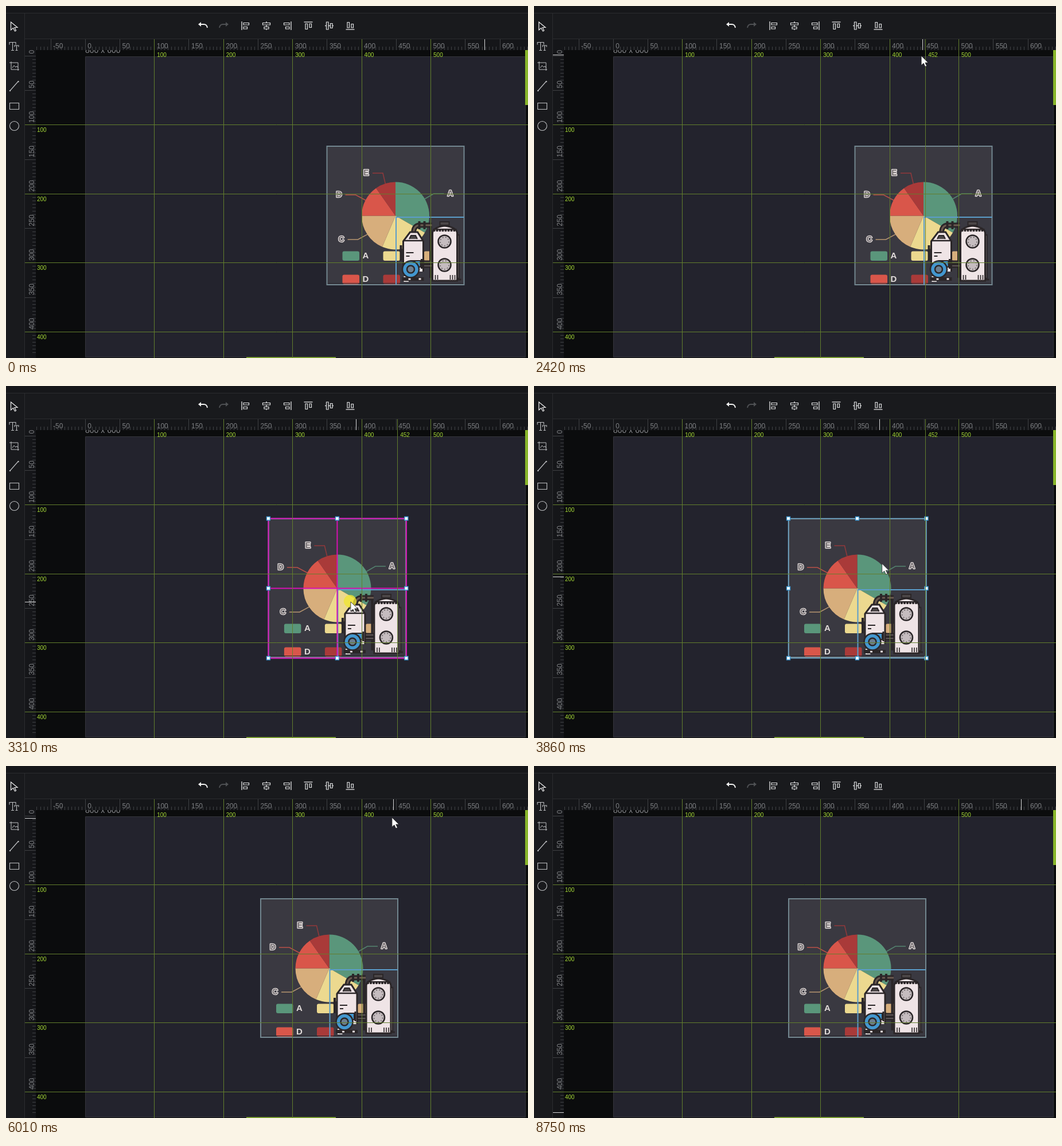
These frames come from a looping animation (910 px wide and 615 px high, 9290 ms). An HTML page with a canvas:

```html
<!DOCTYPE html>
<html>
<head>
<meta charset="utf-8">
<style>
html, body { margin: 0; height: 100%; overflow: hidden; background: #0a0b0c; }
canvas { display: block; }
</style>
</head>
<body>
<canvas id="stage" width="910" height="615"></canvas>
<script>
const ctx = document.getElementById('stage').getContext('2d');
const LOOP = 9290, W = 910, H = 615, UNIT = 1.2045, LAG = 50;
const FONT = '"Liberation Sans", Arial, sans-serif';
const DARK = '#2b2628', PALE = '#efe4e6', BLUE = '#4397cf', MAGENTA = '#d711b4';
const GREY = '#c5bcbf', INK = '#bfc1c3', BAR = '#191a1d', EDGE = '#2b2c2f';
const unitX = u => 138.3 + u * UNIT, unitY = u => 87.5 + u * UNIT;

// Moments of the story, in ms
const ADD_GUIDE = 1210, GRAB = 2750, DROP = 3440, DROP_GUIDE = 5410, DROP_SECOND = 7350, BLINK = 65;

// Moves: start, end, x, y at the end
const POINTER_START = [832, 640];
const POINTER_MOVES = [
  [0, 880, 681, 68], [1810, 2420, 675, 86], [2420, 2700, 710, 371],
  [GRAB, 3030, 643, 375], [3030, 3310, 601, 377], [3310, DROP, 587, 377],
  [3710, 4400, 677, 72], [4600, 4670, 677, 80], [4670, 5210, 673, 90],
  [6010, 6600, 618, 70], [6600, 6810, 612, 86], [7080, 7210, 614, 84],
  [7210, DROP_SECOND, 617, 74], [7610, 8480, 645, 330], [8480, 8750, 892, 665]];
const GROUP_START = [115.5, 13];
const GROUP_MOVES = [[GRAB, 3030, 49, 0], [3030, 3310, 14, 0], [3310, DROP, 0, 0]];

const between = (t, a, b) => t >= a && t < b;

function follow([x, y], moves, t) {
  for (const [from, to, endX, endY] of moves) {
    const p = Math.min(1, Math.max(0, (t - from) / (to - from)));
    x += (endX - x) * p;
    y += (endY - y) * p;
  }
  return [x, y];
}

function paint(fill, stroke, lw = 1) {
  if (fill) { ctx.fillStyle = fill; ctx.fill(); }
  if (stroke) { ctx.strokeStyle = stroke; ctx.lineWidth = lw; ctx.stroke(); }
}
function box(x, y, w, h, fill, stroke, lw, r = 0) {
  ctx.beginPath();
  ctx.roundRect(x, y, w, h, r);
  paint(fill, stroke, lw);
}
function disc(x, y, r, fill, stroke, lw) {
  ctx.beginPath();
  ctx.arc(x, y, r, 0, 7);
  paint(fill, stroke, lw);
}
function line(x1, y1, x2, y2, color, lw = 1) {
  ctx.beginPath();
  ctx.moveTo(x1, y1);
  ctx.lineTo(x2, y2);
  paint(null, color, lw);
}
function at(x, y, draw) {
  ctx.save();
  ctx.translate(x, y);
  draw();
  ctx.restore();
}
function shape(d, x, y, fill, stroke, lw = 1) {
  at(x, y, () => {
    const p = new Path2D(d);
    if (fill) { ctx.fillStyle = fill; ctx.fill(p); }
    if (stroke) { ctx.strokeStyle = stroke; ctx.lineWidth = lw; ctx.stroke(p); }
  });
}
function label(s, x, y, size, color, weight = '', align = 'left') {
  ctx.font = `${weight} ${size}px ${FONT}`;
  ctx.textAlign = align;
  ctx.fillStyle = color;
  ctx.fillText(s, x, y);
}
const crisp = v => Math.floor(v) + .5;
const vline = (x, y1, y2, color) => line(crisp(x), y1, crisp(x), y2, color);
const hline = (y, x1, x2, color) => line(x1, crisp(y), x2, crisp(y), color);

function drawPage() {
  box(0, 0, W, H, '#0b0c0d');
  box(138.5, 88.5, 767, 525, '#23232d', '#34353b');
  label('800 x 600', 138, 82, 14, '#85868a');
}

// Each slice ends where the next begins; tag is the centre of its letter
const SLICES = [
  { letter: 'A', end: 30, color: '#5a967b', tag: [659, 314] },
  { letter: 'B', end: 113, color: '#ecd98f' },
  { letter: 'C', end: 180, color: '#d7ae7c', tag: [469, 394] },
  { letter: 'D', end: 235, color: '#d9564a', tag: [465, 316] },
  { letter: 'E', end: 270, color: '#a93a39', tag: [512.5, 278] }];

function drawChart() {
  const cx = 563.5, cy = 353.5, r = 59, rad = Math.PI / 180;
  let start = -90;
  SLICES.forEach(({ letter, end, color, tag }, i) => {
    ctx.beginPath();
    ctx.moveTo(cx, cy);
    ctx.arc(cx, cy, r, start * rad, end * rad);
    paint(color);
    if (tag) {
      const [x, y] = tag, side = Math.sign(cx - x), middle = (start + end) / 2 * rad;
      ctx.globalAlpha = .8;
      ctx.beginPath();
      ctx.moveTo(x + side * 11, y + 1);
      ctx.lineTo(x + side * 29, y + 1);
      ctx.lineTo(cx + r * Math.cos(middle), cy + r * Math.sin(middle));
      paint(null, color, 1.5);
      ctx.globalAlpha = 1;
      ctx.lineJoin = 'round';
      label(letter, x, y + 5, 14, '#716b6e', 'bold', 'center');
      ctx.strokeStyle = '#e4dedd';
      ctx.lineWidth = 2.6;
      ctx.strokeText(letter, x, y + 5);
      ctx.lineJoin = 'miter';
      ctx.fillText(letter, x, y + 5);
    }
    const column = i % 3, row = Math.floor(i / 3);
    box(471 + column * 71, 415.5 + row * 41, 29.5, 16.5, color, null, 0, 3);
    label(letter, 506 + column * 71, 427.5 + row * 41, 15, '#e2dcda', 'bold');
    start = end;
  });
  hline(471, 446, 682, '#292830');
}

function drawMachine() {
  // connecting pipes
  const elbow = 'M0 14Q0 0 11 0H32';
  shape(elbow, 595, 370, null, DARK, 9);
  shape(elbow, 595, 370, null, '#6b5a50', 3);
  for (const x of [603, 612]) box(x, 363, 4, 14, DARK);
  line(624.5, 374, 624.5, 462, DARK, 4);
  line(611, 438, 630, 438, DARK, 13);
  for (const y of [435, 441]) line(612, y, 628, y, '#6f6668', 1.5);
  // small tank
  shape('M0 69V16L12 0H25L35 16V69', 577, 382, PALE, DARK, 3);
  shape('M0 6L3 0H11L14 6', 587.5, 388, '#4c4748', DARK, 2);
  line(577, 397, 612, 397, DARK, 2.5);
  line(582, 418, 595, 418, DARK, 2);
  line(582, 424, 588, 424, DARK, 2);
  line(573, 405, 573, 432, DARK, 4);
  line(575, 464, 613, 464, DARK, 6);
  for (const x of [586, 604]) line(x, 464, x + 4, 464, PALE, 3);
  // blower
  box(590, 432, 17, 11, BLUE, DARK, 2);
  line(609, 429, 609, 446, DARK, 3);
  disc(590, 447, 14.5, BLUE, DARK, 2.5);
  disc(590, 447, 6.5, '#6c7f90', DARK, 2.5);
  // large tank
  box(670, 387, 4, 76, PALE, DARK, 2.5);
  box(641, 364, 16, 6, '#4b4647', DARK, 2);
  shape('M0 96V13Q0 3 21 0Q43 3 43 13V96Z', 628, 371, PALE, DARK, 3);
  line(629, 377, 670, 377, DARK, 2);
  for (let x = 631; x < 670; x += 5) disc(x, 379, 2.2, DARK);
  for (const y of [398.5, 439.5]) {
    disc(649, y, 11, GREY, DARK, 2.5);
    ctx.setLineDash([2, 3.2]);
    disc(649, y, 7.5, null, '#655e60', 1.5);
    ctx.setLineDash([]);
  }
  for (const x of [633, 637, 659, 663, 667]) line(x, 457, x, 465, DARK, 1.6);
  line(671, 465, 678, 465, DARK, 3);
}

function drawSelection(t) {
  const xs = [443.5, 563.5, 684], ys = [231.5, 353.5, 475.5];
  const [left, mid, right] = xs, [top, center, bottom] = ys;
  box(left, top, right - left, bottom - top, null, '#6aa3c6', 1.5);
  if (between(t, 2950, DROP))
    for (const y of ys) line(left, y, right, y, MAGENTA, 2);
  if (between(t, 3290, DROP))
    for (const x of xs) line(x, top, x, bottom, MAGENTA, 2);
  for (const x of xs) for (const y of ys)
    if (x !== mid || y !== center) box(x - 3, y - 3, 6, 6, '#fff', '#3e9bd6', 1.3);
}

function drawGroup(t) {
  const [dx, dy] = follow(GROUP_START, GROUP_MOVES, t);
  at(dx, dy, () => {
    box(444, 232, 239, 242, '#3a3941');
    drawChart();
    drawMachine();
    box(444, 232, 239, 242, null, '#72868f', 2);
    shape('M0 118V0H118.5', 564.5, 356, null, '#5b9dca', 2);
    if (between(t, GRAB, DROP_GUIDE)) drawSelection(t);
  });
}

function drawRulers(mx, my) {
  box(32, 57, W - 32, 20, '#151619');
  box(32, 77, 20, H - 77, '#151619');
  const tick = '#3f4144', text = '#7d7f82', marker = '#d6d7d8';
  for (let u = -70; u <= 640; u += 5) {
    const major = u % 50 === 0;
    vline(unitX(u), major ? 58 : 71, 77, tick);
    if (major) label(u, unitX(u) + 4, 74, 12, text);
  }
  ctx.save();
  ctx.beginPath();
  ctx.rect(32, 77, 20, H);
  ctx.clip();
  for (let u = 0; u <= 430; u += 5) {
    const major = u % 50 === 0;
    hline(unitY(u), major ? 33 : 46, 52, tick);
    if (major) at(48.5, unitY(u) - 4, () => {
      ctx.rotate(-Math.PI / 2);
      label(u, 0, 0, 12, text);
    });
  }
  ctx.restore();
  vline(mx, 58, 77, marker);
  hline(my, 33, 52, marker);
}

function drawGuides(t, mx) {
  const color = '#627e2d', text = '#a5d936';
  const columns = [100, 200, 300, 500];
  if (t < DROP_SECOND + BLINK) columns.push(400);
  if (between(t, ADD_GUIDE, DROP_GUIDE + BLINK)) columns.push(452);
  for (const u of columns) {
    vline(unitX(u), 58, H, color);
    label(u, unitX(u) + 4.5, 89, 10, text);
  }
  for (const u of [100, 200, 300, 400]) {
    hline(unitY(u), 33, W, color);
    label(u, 54, unitY(u) + 12.5, 10, text);
  }
}

function drawPreview(mx) {
  vline(mx, 58, H, '#7f9a3f');
  box(mx + 5, 61, 23, 14, '#fff');
  label(Math.round((mx - 138.3) / UNIT), mx + 6.5, 72.5, 12, '#111');
}

// A reference line with two bars; mode -1, 0 or 1 picks the aligned edge
function alignIcon(x, mode, upright) {
  at(x, 34.5, () => {
    if (upright) ctx.transform(0, 1, 1, 0, 0, 0);
    line(mode * 6.5, -7.5, mode * 6.5, 7.5, '#e3e4e5', 1.3);
    for (const [w, y] of [[mode ? 9.5 : 13, -5], [mode ? 6.5 : 8, 2]])
      box(-w / 2 + mode * (3.5 - w / 2), y, w, 3.5, BAR, '#e3e4e5', 1.2);
  });
}

function undoIcon(x, flip, color) {
  at(x, 34, () => {
    ctx.scale(flip, 1);
    shape('M-5 -2H2Q7 -2 8 4', 0, 0, null, color, 1.8);
    shape('M-8 -2L-3 -6V2Z', 0, 0, color);
  });
}

function drawChrome() {
  box(0, 0, W, 13, '#16171a');
  box(0, 13, W, 44, BAR);
  box(0, 13, 32, H, BAR);
  hline(12, 0, W, EDGE);
  hline(57, 32, W, EDGE);
  vline(32, 13, H, EDGE);
  box(905, 77, 5, 96, '#88b52a');
  box(419, 613.5, 156, 2, '#88b52a');

  undoIcon(343, 1, '#f1f1f1');
  undoIcon(380, -1, '#4f5154');
  for (let i = 0; i < 6; i++) alignIcon(417.5 + i * 36.5, i % 3 - 1, i > 2);

  shape('M0 0V14L4 10.5L7 16L9 15L6.5 9.5H11.5Z', 8.5, 28, null, '#eee', 1.2);
  shape('M0 4V0H11V4M5.5 0V14M3 14H8M9 8V5.5H16V8M12.5 6V14M10.5 14H14.5', 6, 63.5, null, INK, 1.1);
  shape('M3 0V14H17M0 2H15V16M5 11L8 7L11 10L13 8L15 11', 6, 97, null, INK);
  line(7, 148, 21, 132, INK, 1.2);
  disc(7, 148, 1.2, INK);
  disc(21.5, 132, 1.2, INK);
  box(6.5, 169.5, 16, 11, null, INK, 1.1);
  disc(14.5, 209.5, 8, null, INK, 1.1);
}

function drawPointer(t, x, y) {
  if (y > 590) return;
  const clicking = [ADD_GUIDE, DROP_GUIDE, DROP_SECOND].some(c => between(t, c, c + BLINK));
  if (clicking || between(t, GRAB, DROP)) disc(x - 1, y - 1, 11, 'rgba(240,230,50,.78)');
  const hand = between(t, 1540, 1810) || between(t, 4470, DROP_GUIDE + BLINK);
  const outline = hand
    ? 'M0 1Q1.5 -1 3 1V8L10 10Q11.5 11 10.5 15L9 21H1L-5 14Q-7 11 -5 10.5L0 13Z'
    : 'M0 0V16.5L4 13L6.8 19L9.5 17.8L6.8 12H12Z';
  shape(outline, x, y, '#fff', '#222', 0.8);
}

function render(t) {
  const [px, py] = follow(POINTER_START, POINTER_MOVES, t);
  const [lx, ly] = follow(POINTER_START, POINTER_MOVES, t - LAG);
  const mx = lx + 2, my = ly + 1;
  drawPage();
  drawGroup(t);
  drawRulers(mx, my);
  drawChrome();
  drawGuides(t);
  if (my < 78 && !between(t, ADD_GUIDE, GRAB)) drawPreview(mx);
  drawPointer(t, px, py);
}

const begin = performance.now();
(function tick() {
  render((performance.now() - begin) % LOOP);
  requestAnimationFrame(tick);
})();
</script>
</body>
</html>
```
